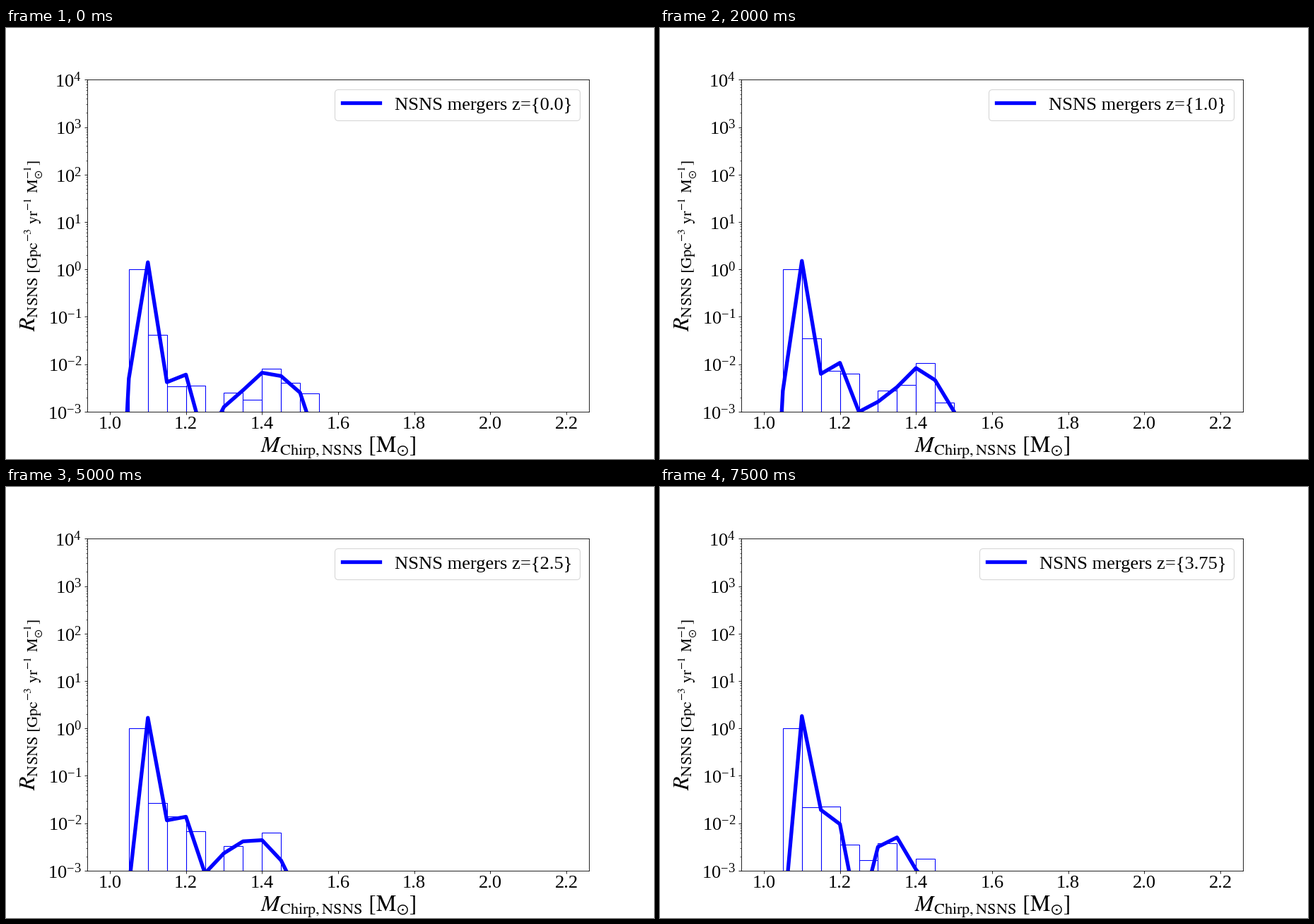
Animation, 917 px wide and 611 px high, one loop 8 s. Source, as a matplotlib script:

```python
import matplotlib.pyplot as plt
import numpy as np
from matplotlib.animation import FuncAnimation
from matplotlib.ticker import LogLocator, NullFormatter

W, H, DPI = 917, 611, 76.4
STEPS, INTERVAL = 16, 500
DZ = 0.25
BIN = 0.05
BLUE = "#0000ff"

plt.rcParams.update({
    "font.family": "Liberation Serif",
    "mathtext.fontset": "stix",
    "font.size": 25,
    "axes.labelsize": 30,
})


def arc(t, peak, when, bend):
    """Rise to a peak and fall again."""
    return peak - bend * (t - when) ** 2


def bar_rates(t):
    """Histogram heights from 1.05 up; t runs from 0 to 1."""
    return 10.0 ** np.array([
        0,
        -1.38 - 0.285 * t,
        -2.47 + 0.82 * t ** 0.7,
        arc(t, -2.13, 0.5, 1.3),
        -6 + 3.22 * t,
        -2.6 + 0.18 * t,
        arc(t, -2.43, 0.22, 6.5),
        arc(t, -1.98, 0.28, 1.5),
        -2.4 - 1.55 * t,
        -2.62 - 8 * t ** 2,
    ])


def curve_rates(t):
    """Curve heights from 1.0 up: a sharp peak, a dip and a fading hump."""
    return 10.0 ** np.array([
        -10,
        -2.3 - 1.9 * t ** 1.5,
        0.15 + 0.11 * t,
        -2.38 + 0.66 * t,
        arc(t, -1.86, 0.6, 1),
        arc(t, -2.87, 0.45, 4),
        -2.9 + 0.4 * t,
        -2.55 + 0.25 * t,
        arc(t, -2.08, 0.25, 1.6),
        -2.25 - 1.2 * t ** 2,
        -2.6 - 1.5 * t,
        -3.8 - t,
    ])


def legend_text(z):
    return f"NSNS mergers z={{{z}}}"


fig = plt.figure(figsize=((W + 1e-6) / DPI, (H + 1e-6) / DPI), dpi=DPI,
                 facecolor="white")
ax = fig.add_axes([0.125, 0.11, 0.775, 0.77])
ax.set_yscale("log")

heights, curve = bar_rates(0), curve_rates(0)
bars = ax.bar(1.05 + BIN * np.arange(len(heights)), heights, BIN,
              align="edge", fill=False, edgecolor=BLUE, linewidth=1)
line, = ax.plot(1.0 + BIN * np.arange(len(curve)), curve, color=BLUE, lw=5,
                label=legend_text(0.0))

ax.set_xlim(0.94, 2.26)
ax.set_ylim(1e-3, 1e4)
ax.set_xticks(np.arange(1.0, 2.3, 0.2))
ax.xaxis.set_major_formatter("{x:.1f}")
ax.yaxis.set_major_locator(LogLocator(numticks=20))
ax.yaxis.set_minor_locator(LogLocator(subs=np.arange(2, 10), numticks=20))
ax.yaxis.set_minor_formatter(NullFormatter())
ax.set_xlabel(r"$M_{\mathrm{Chirp,NSNS}}\ \mathrm{[M_{\odot}]}$")
ax.set_ylabel(r"$R_{\mathrm{NSNS\ [Gpc^{-3}\ yr^{-1}\ M_{\odot}^{-1}]}}$")
label = ax.legend(loc="upper right").get_texts()[0]


def update(i):
    t = i / (STEPS - 1)
    for bar, height in zip(bars, bar_rates(t)):
        bar.set_height(height)
    line.set_ydata(curve_rates(t))
    label.set_text(legend_text(i * DZ))
    return [*bars, line, label]


anim = FuncAnimation(fig, update, frames=STEPS, interval=INTERVAL,
                     repeat=True, repeat_delay=0, blit=False)
plt.show()
```
